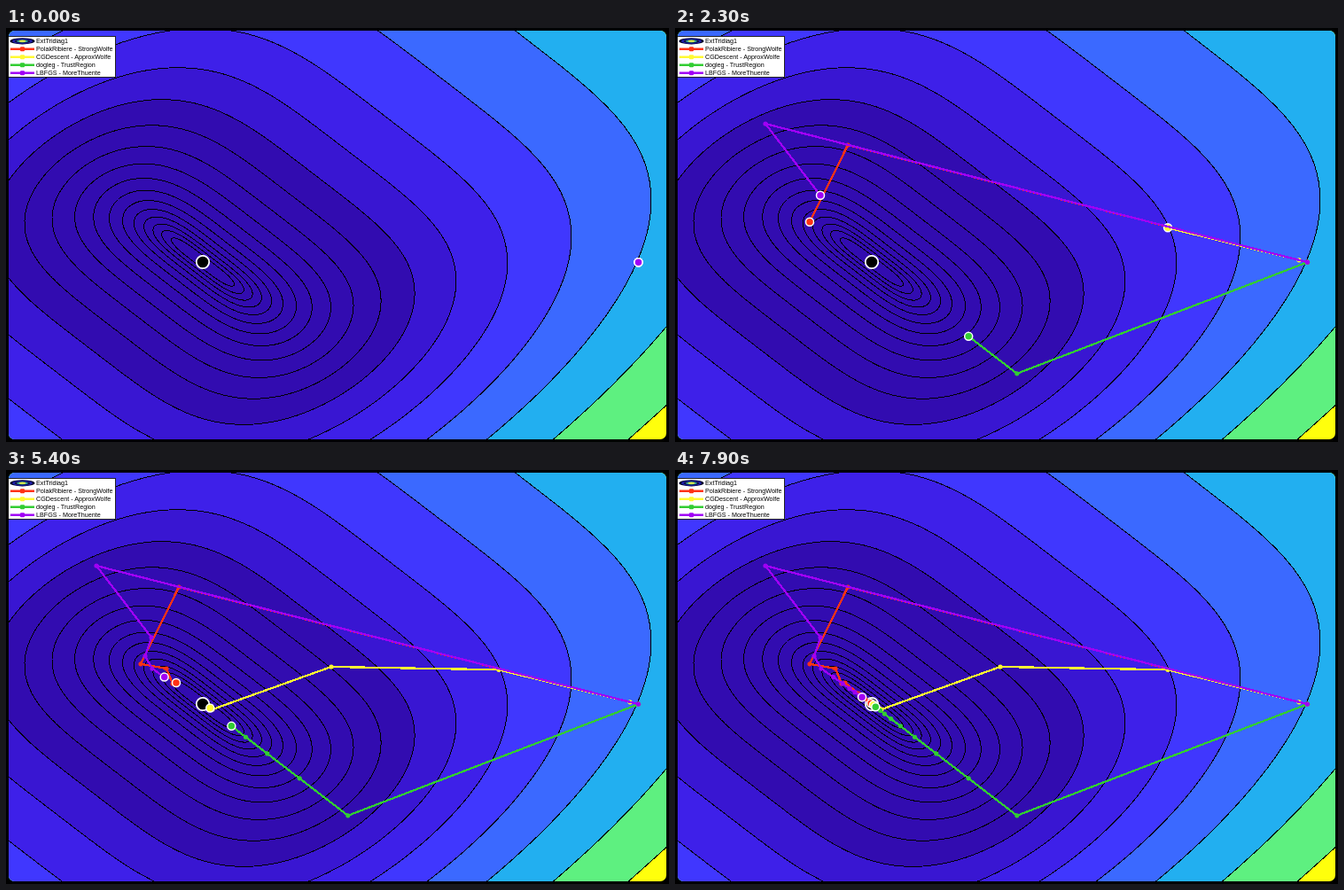
An HTML page that plays this animation: 748 by 467 pixels, repeating every 8 s.

```html
<!DOCTYPE html>
<html lang="en">
<head>
<meta charset="utf-8">
<title>Optimizer paths</title>
<style>
html, body { margin: 0; width: 100%; height: 100%; overflow: hidden; background: #000; }
svg { display: block; width: 748px; height: 467px; }
text { font: 7.2px "Liberation Sans", Arial, sans-serif; fill: #000; }
</style>
</head>
<body>
<svg id="stage" viewBox="0 0 748 467">
  <clipPath id="plot"><rect x="3" y="3" width="742" height="461" rx="7"/></clipPath>
  <g clip-path="url(#plot)">
    <rect width="748" height="467" fill="#ffff0c"/>
    <g id="contours" stroke="#000" stroke-width="1" shape-rendering="crispEdges"></g>
    <g id="legend"></g>
  </g>
  <circle cx="222" cy="264" r="7.2" fill="#000" stroke="#fff" stroke-width="1.8"/>
  <g id="trails"></g>
</svg>
<script>
const LOOP = 8000;
const STEPS = 10;
const CENTER = [222, 264];
const SCALE = [489.8, 375.7];
const START = [713.5, 264.2];
const BANDS = ["#5ef080", "#22aff0", "#3b69ff", "#4037fe", "#3e20e9", "#3916d2", "#320cb0"];

// first steps as key points, then the distance to the minimum shrinks by a constant ratio
const methods = [
  { name: "PolakRibiere - StrongWolfe", color: "#ff3214", ratio: 0.5,
    keys: [START, [195, 132], [152, 218.8], [181, 224], [188, 241], [192, 240]] },
  { name: "CGDescent - ApproxWolfe", color: "#fffa32", ratio: 0.75,
    keys: [START, [704, 261.8], [556, 225.3], [367, 222], [233, 270]] },
  { name: "dogleg - TrustRegion", color: "#32cd32", ratio: 2 / 3,
    keys: [START, [385.8, 389.8]] },
  { name: "LBFGS - MoreThuente", color: "#a000f5", ratio: 0.76,
    keys: [START, [102, 108], [164, 188.8], [157, 210], [165, 224]] }
];

function add(parent, tag, attributes, content = "") {
  const node = document.createElementNS("http://www.w3.org/2000/svg", tag);
  for (const key in attributes) node.setAttribute(key, attributes[key]);
  node.textContent = content;
  parent.appendChild(node);
  return node;
}

function pathPoints({ keys, ratio }) {
  const points = [...keys];
  while (points.length <= STEPS) {
    const last = points[points.length - 1];
    points.push(last.map((value, axis) => CENTER[axis] + (value - CENTER[axis]) * ratio));
  }
  return points;
}

// level set of (u + v)^2 + (u - v)^4
function contourPath(level) {
  const points = [];
  for (let i = 0; i < 360; i++) {
    const t = i / 180 * Math.PI, c = Math.cos(t);
    const a = Math.sqrt(level) * Math.sin(t) * Math.sqrt(1 + c * c);
    const b = level ** 0.25 * c;
    const x = CENTER[0] + SCALE[0] * (a + b) / 2;
    const y = CENTER[1] - SCALE[1] * (a - b) / 2;
    points.push(x.toFixed(1) + " " + y.toFixed(1));
  }
  return "M" + points.join("L") + "Z";
}

function drawContours() {
  const group = document.getElementById("contours");
  for (let i = 0; i < 18; i++) {
    const level = 2.0007 * Math.exp((2 - i) / 2) - 0.0007;
    add(group, "path", { d: contourPath(level), fill: BANDS[Math.min(i, BANDS.length - 1)] });
  }
}

function drawLegend() {
  const group = document.getElementById("legend");
  add(group, "rect", { x: 2.5, y: 9.5, width: 121, height: 46, fill: "#fff", stroke: "#222" });
  ["#000028", "#2020b0", "#101040", "#30a0a0", "#f0f040"].forEach((fill, i) => {
    const size = 1 - i / 5.5;
    add(group, "ellipse", { cx: 18.5, cy: 14.8, rx: 14 * size, ry: 3.6 * size, fill });
  });
  add(group, "text", { x: 34, y: 17.4 }, "ExtTridiag1");
  methods.forEach(({ name, color }, i) => {
    const y = 23.8 + 9 * i;
    add(group, "path", { d: `M5 ${y}H32`, stroke: color, "stroke-width": 2.4 });
    add(group, "rect", { x: 16, y: y - 2.5, width: 5, height: 5, rx: 1, fill: color });
    add(group, "text", { x: 34, y: y + 2.6 }, name);
  });
}

function createTrail(method) {
  const { color } = method;
  const points = pathPoints(method);
  const group = add(document.getElementById("trails"), "g", {});
  const line = add(group, "polyline", { fill: "none", stroke: color, "stroke-width": 2.3,
    "stroke-linejoin": "round", "shape-rendering": "crispEdges" });
  const dots = points.map(([cx, cy]) => add(group, "circle", { cx, cy, r: 2.6, fill: color }));
  const head = add(group, "circle", { r: 4.5, fill: color, stroke: "#fff", "stroke-width": 1.5 });
  return step => {
    line.setAttribute("points", points.slice(0, step + 1).join(" "));
    dots.forEach((dot, i) => dot.setAttribute("visibility", i < step ? "visible" : "hidden"));
    head.setAttribute("cx", points[step][0]);
    head.setAttribute("cy", points[step][1]);
  };
}

// step n begins at 1085 n - 30 n^2 ms: the pace slowly rises
function stepAt(time) {
  return Math.min(STEPS, Math.floor((1085 - Math.sqrt(1085 ** 2 - 120 * time)) / 60));
}

drawContours();
drawLegend();
const trails = methods.map(createTrail);

function render(time) {
  const step = stepAt(time);
  trails.forEach(update => update(step));
}

const begin = performance.now();
function tick() {
  render((performance.now() - begin) % LOOP);
  requestAnimationFrame(tick);
}
tick();
</script>
</body>
</html>
```
